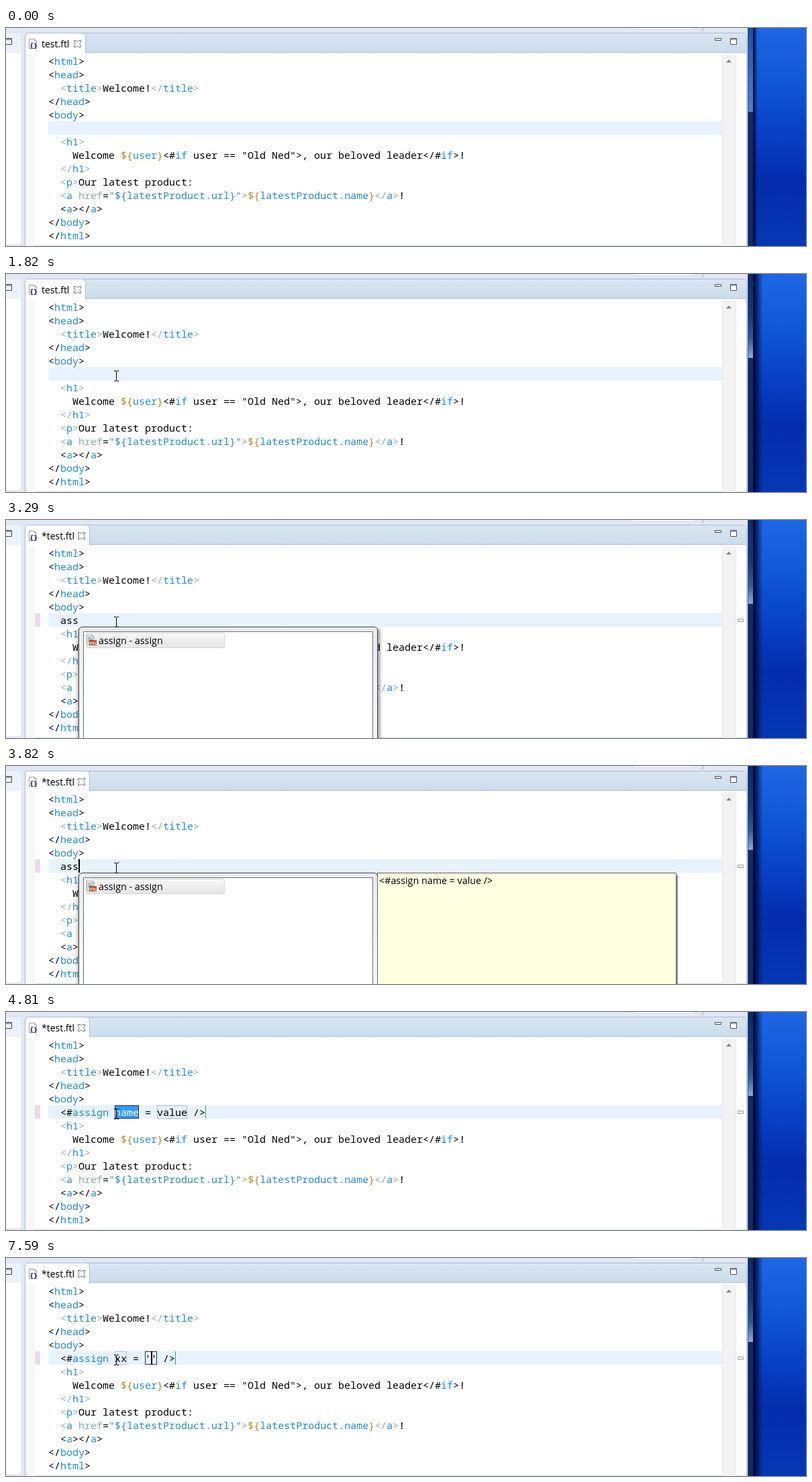
An HTML page that plays this animation: 1192x325 px, repeating every 8000 ms.

```html
<!DOCTYPE html>
<html lang="en">
<head>
<meta charset="utf-8">
<title>Template editor</title>
<style>
html, body { margin: 0; width: 100%; height: 100%; overflow: hidden; background: #e2e7f5; }
svg, pre { position: absolute; left: 0; top: 0; margin: 0; }
svg { width: 1192px; height: 325px; }
svg text { font: 14.3px "Open Sans", "Noto Sans", sans-serif; }
pre { left: 63px; top: 39px; font: 15px/20px "Noto Sans Mono", "DejaVu Sans Mono", monospace; color: #000; }
pre div { height: 20px; }
b, i, s, u { font-weight: 400; font-style: normal; text-decoration: none; }
b { color: #268bd2; }
i { color: #93a9a9; }
s { color: #a98a2a; }
u { color: #2a91a8; }
em { display: inline-block; height: 20px; vertical-align: top; font-style: normal; box-shadow: inset 0 0 0 1px #a9bfd9; }
em.on { box-shadow: inset 0 0 0 1px #26304a; }
em.sel { background: #3399ff; color: #fff; }
em.end { box-shadow: 1px 0 #1fb141; }
</style>
</head>
<body>
<svg viewBox="0 0 1192 325">
  <defs>
    <linearGradient id="sky" x2="0" y2="1">
      <stop offset="0" stop-color="#1f66e4"/><stop offset=".28" stop-color="#0f54d4"/>
      <stop offset=".5" stop-color="#083ec4"/><stop offset=".7" stop-color="#052cac"/>
      <stop offset="1" stop-color="#0638b4"/>
    </linearGradient>
    <linearGradient id="shade">
      <stop offset="0" stop-color="#000318"/><stop offset=".3" stop-color="#000830" stop-opacity=".75"/>
      <stop offset="1" stop-color="#001060" stop-opacity="0"/>
    </linearGradient>
    <linearGradient id="head" x2="0" y2="1">
      <stop offset="0" stop-color="#d9e5f2"/><stop offset="1" stop-color="#cbdcec"/>
    </linearGradient>
    <linearGradient id="idle" x2="0" y2="1">
      <stop offset="0" stop-color="#1c4fae"/><stop offset="1" stop-color="#4a80d0"/>
    </linearGradient>
    <linearGradient id="active" x2="0" y2="1">
      <stop offset="0" stop-color="#0a2a78"/><stop offset=".5" stop-color="#123880"/>
      <stop offset=".78" stop-color="#2c5ca8"/><stop offset="1" stop-color="#86aede"/>
    </linearGradient>
    <linearGradient id="item" x2="0" y2="1">
      <stop offset="0" stop-color="#f8f8f8"/><stop offset="1" stop-color="#e5e5e5"/>
    </linearGradient>
    <linearGradient id="glass" x2="0" y2="1">
      <stop offset="0" stop-color="#e8ebee"/><stop offset="1" stop-color="#f7f8f9"/>
    </linearGradient>
    <filter id="blur" x="-5%" y="-10%" width="110%" height="120%"><feGaussianBlur stdDeviation="2.5"/></filter>
    <g id="page">
      <path d="M.5.5h8l3 3v11h-11z" fill="#fff" stroke="#a5a299"/>
      <path d="M8.5.5v3h3" fill="none" stroke="#a5a299"/>
    </g>
  </defs>

  <!-- desktop and window frame -->
  <path d="M1113 0h79v325h-79z" fill="url(#sky)"/>
  <rect id="shadow" x="1113" height="325" fill="url(#shade)"/>
  <path d="M1106 0h7v325h-7z" fill="#10296e"/>
  <path id="frame" d="M1106 0h7v125h-7z"/>
  <path d="M1105.5 0v325" stroke="#45537c"/>
  <path d="M1113.5 0v325" stroke="#081026"/>

  <!-- neighbouring panel -->
  <path d="M935 0h89v1h-89z" fill="#fff"/>
  <path d="M1038.500 0v3q0 1.500-2.500 1.500" fill="none" stroke="#a9adba"/>
  <path d="M0 7.500h18q5 0 5 6V318q0 5-5 5H0z" fill="#fff" stroke="#dfe5f2"/>
  <path d="M0 8h18q5 0 5 5v24H0z" fill="#edf1fa"/>
  <path d="M0 15.500h8.500v9H0M0 17h8" fill="none" stroke="#4a4a4a"/>

  <!-- editor -->
  <path d="M28.500 325V13q0-5.500 5-5.500H1098q5.500 0 5.500 5.500V325z" fill="#fff" stroke="#a9bbd0"/>
  <path d="M29 37V13q0-5 5-5H1098q5 0 5 5v24z" fill="url(#head)"/>
  <path d="M29 36.500H1103" stroke="#abc0d8"/>
  <path id="tab" fill="#fff" stroke="#abc0d8"/>
  <path d="M30 39h13v286H30z" fill="#f7f7f7"/>
  <path d="M63 139h1004v20H63z" fill="#e8f2fe"/>
  <path d="M1068 39h20v286h-20z" fill="#f2f2f2"/>
  <path d="M1067.500 39v286M1087.500 39v286" stroke="#ebebeb"/>
  <path d="M1073 51.500l4-4.500 4 4.500z" fill="#858585"/>
  <path d="M1056.500 15.500h9v3h-9zM1079.500 15.500h9v9h-9zM1080 17h8" fill="#fff" stroke="#505050"/>
  <use href="#page" x="34" y="16"/>
  <text x="36" y="30" style="font:bold 11px 'Open Sans',sans-serif;letter-spacing:1.5px" fill="#1d2c68">{}</text>
  <text id="name" x="53" y="29" style="font-size:14px"></text>
  <path id="close" d="M-5-5h3l2 2 2-2h3v3l-2 2 2 2v3h-3l-2-2-2 2h-3v-3l2-2-2-2z" fill="#fff" stroke="#6c7280"/>
  <g id="dirty">
    <path d="M43 139h8v20h-8z" fill="#ecd9ea"/>
    <path d="M1090.500 147.500h8v4h-8z" fill="#f3f3f3" stroke="#a5a5a5"/>
  </g>
</svg>

<pre id="code"></pre>

<svg viewBox="0 0 1192 325">
  <g id="list">
    <path d="M107 162h450v170H107z" opacity=".42" filter="url(#blur)"/>
    <path d="M108.500 330V165q0-5.500 6-5.500H548q5.500 0 5.500 5.500V330z" fill="url(#glass)" stroke="#48494c"/>
    <path d="M115.500 330V166.500H546.500V330z" fill="#fff" stroke="#6e7073"/>
    <rect x="119.500" y="168.500" width="206" height="22" rx="2.500" fill="url(#item)" stroke="#d6d6d6"/>
    <use href="#page" x="120" y="171"/>
    <path d="M122 174.500h5M122 176.500h8M122 178.500h8M122 180.500h3" stroke="#4b87b8"/>
    <path d="M124 179h11v8h-11z" fill="#c3562b"/>
    <text x="125" y="186" style="font:bold 6px 'Open Sans',sans-serif" fill="#fff">FTL</text>
    <text x="138" y="185">assign - assign</text>
  </g>
  <g id="doc">
    <path d="M990 163h11v162h-11z" opacity=".45"/>
    <path d="M553.500 330V159.500H998.500V330z" fill="#ffffe1" stroke="#646464"/>
    <text x="556" y="176">&lt;#assign name = value /&gt;</text>
  </g>
  <path id="caret" d="M0 139h2v20h-2z"/>
  <path id="beam" d="M0 .5h3M4 .5h3M3.500 1v14M0 15.500h3M4 15.500h3" fill="none" stroke="#000"/>
  <path id="arrow" d="M1095.500 306.500v16l4-4 3 6.500 2.500-1-3-6.500h5z" fill="#fff" stroke="#000"/>
</svg>

<script>
const LOOP = 8000, ROW = 5;
const $ = id => document.getElementById(id);
const show = (id, on) => $(id).style.display = on ? '' : 'none';

// b: keyword, i: dim, s: interpolation, u: string
const open = n => `&lt;<b>${n}</b>&gt;`;
const shut = n => `&lt;/<b>${n}</b>&gt;`;
const dim = n => `<i>&lt;</i><b>${n}</b><i>&gt;</i>`;
const dimShut = n => `<i>&lt;/</i><b>${n}</b><i>&gt;</i>`;
const slot = n => '<s>${</s><b>' + n + '</b><s>}</s>';

const lines = [
  open('html'),
  open('head'),
  `  ${dim('title')}Welcome!${dimShut('title')}`,
  shut('head'),
  open('body'),
  '',
  `  ${dim('h1')}`,
  `    Welcome ${slot('user')}&lt;#<b>if</b> user == "Old Ned"&gt;, our beloved leader&lt;/#<b>if</b>&gt;!`,
  `  ${dimShut('h1')}`,
  `  ${dim('p')}Our latest product:`,
  '  <i>&lt;</i><b>a</b> <i>href</i>=<u>"${latestProduct.url}"</u><i>&gt;</i>' +
    `${slot('latestProduct.name')}${dimShut('a')}!`,
  `  ${open('a')}${shut('a')}`,
  shut('body'),
  shut('html')
];
$('code').innerHTML = lines.map(l => `<div>${l}</div>`).join('');
const row = $('code').children[ROW];

const field = (text, cls = '') => `<em class="${cls}">${text}</em>`;
const assign = (name, value) =>
  `  &lt;#<b>assign</b> ${name} = ${value} <em class="end">/&gt;</em>`;
const named = assign(field('name', 'on sel'), field('value'));
const valued = assign(field('xx'), field('value', 'on sel'));

// start time, text of the edited row, caret column (-1 when hidden)
const steps = [
  [0, '', -1],
  [1280, '', 2],
  [1820, '', -1],
  [2360, '', 2],
  [2440, '  a', 3],
  [2600, '  as', 4],
  [2750, '  ass', 5],
  [3290, '  ass', -1],
  [3820, '  ass', 5],
  [4280, named.replace(/<\/?b>/g, ''), 15],
  [4360, named, 15],
  [4810, named, -1],
  [5350, named, 15],
  [5970, assign(field('x', 'on'), field('value')), 12],
  [6120, assign(field('xx', 'on'), field('value')), 13],
  [6500, valued, 21],
  [7040, valued, -1],
  [7500, assign(field('xx'), field("'", 'on')), 17],
  [7590, assign(field('xx'), field("''", 'on')), 17]
];

function movePointer(t) {
  const step = t < 360 ? 0 : Math.min(9, Math.floor((t - 360) / 76.25) + 1);
  const p = step / 9;
  const x = Math.round(445 - 284 * p * (2 - p));
  const y = Math.round(162 - 18 * p - 76 * p * (1 - p));
  $('beam').setAttribute('transform', `translate(${x} ${y})`);
  show('beam', t >= 210);
  show('arrow', t >= 140 && t < 210);
}

let shown;
function edit(t) {
  const step = steps.findLast(s => s[0] <= t);
  if (step === shown) return;
  shown = step;
  const [start, text, col] = step;
  row.innerHTML = text;
  show('caret', col >= 0);
  $('caret').setAttribute('transform', `translate(${63 + 9 * col})`);

  const dirty = start >= 2440, right = dirty ? 124.5 : 118.5;
  show('dirty', dirty);
  $('name').textContent = (dirty ? '*' : '') + 'test.ftl';
  $('tab').setAttribute('d', `M28.5 38V13q0-5.500 5-5.500H${right - 6}q6 0 6 6V38`);
  $('close').setAttribute('transform', `translate(${right - 12} 23.5)`);

  const focused = start >= 1280;
  $('frame').setAttribute('fill', focused ? 'url(#active)' : 'url(#idle)');
  $('shadow').setAttribute('width', focused ? 15 : 7);
}

function draw() {
  const t = performance.now() % LOOP;
  edit(t);
  movePointer(t);
  show('list', t >= 3290 && t < 4210);
  show('doc', t >= 3820 && t < 4210);
  requestAnimationFrame(draw);
}
draw();
</script>
</body>
</html>
```
